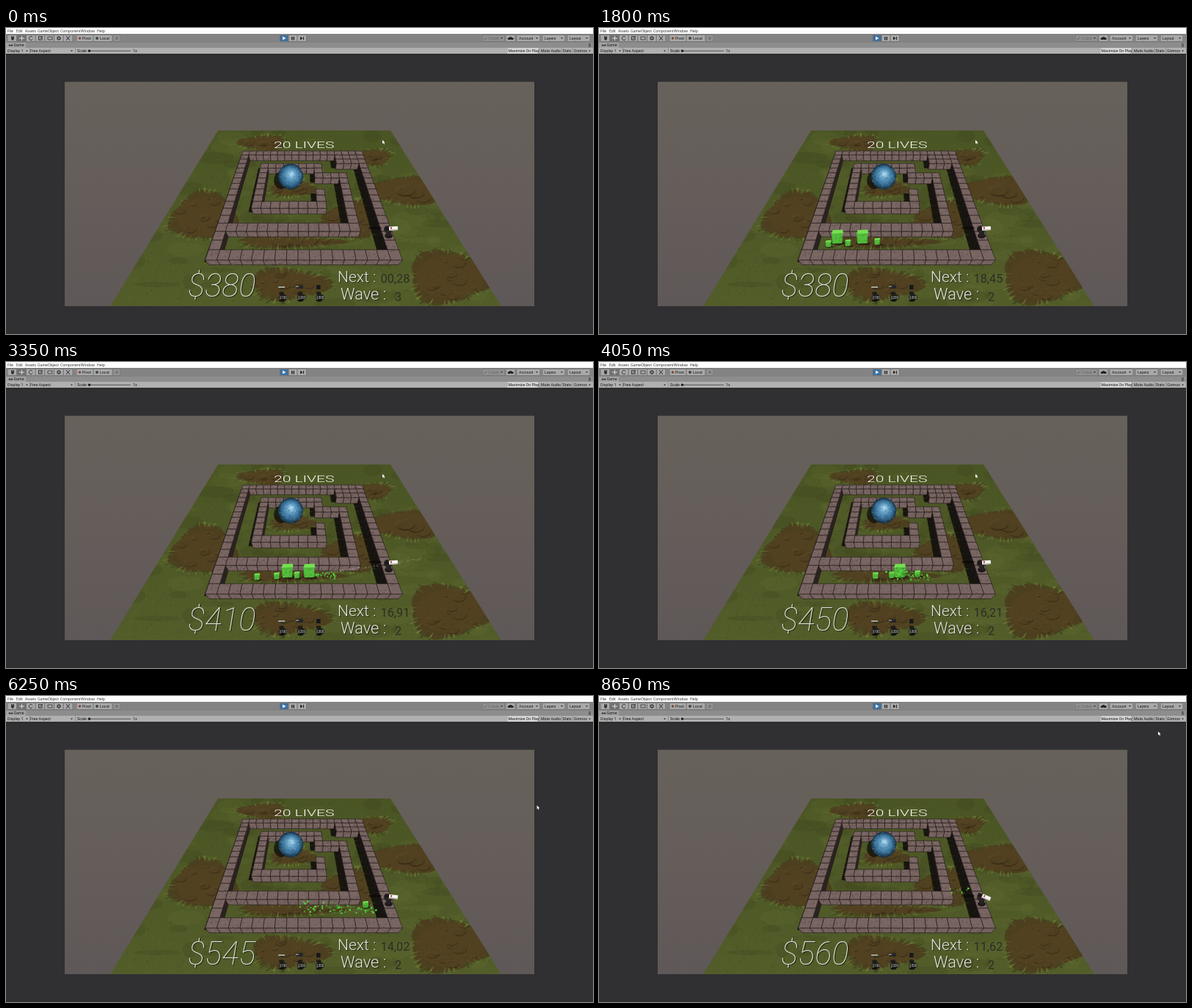
Recreate the animation shown at these times as an HTML page with a canvas. Size 800 by 418 pixels, loop 8700 ms.

```html
<!DOCTYPE html>
<html lang="en">
<head>
<meta charset="utf-8">
<title>Tower defence</title>
<style>
html, body { margin: 0; width: 100%; height: 100%; overflow: hidden; background: #302f32; }
canvas { display: block; width: 800px; height: 418px; }
</style>
</head>
<body>
<canvas id="stage" width="800" height="418"></canvas>
<script>
const LOOP = 8.7, TAU = Math.PI * 2;
const stage = document.getElementById('stage').getContext('2d');
const base = document.createElement('canvas');
base.width = 800; base.height = 418;
let g = base.getContext('2d');

function seeded(seed) {
  return () => {
    seed = (seed + 0x6D2B79F5) | 0;
    let v = Math.imul(seed ^ (seed >>> 15), 1 | seed);
    v ^= v + Math.imul(v ^ (v >>> 7), 61 | v);
    return ((v ^ (v >>> 14)) >>> 0) / 4294967296;
  };
}
const clamp = k => Math.min(1, Math.max(0, k));
const ease = k => { k = clamp(k); return k * k * (3 - 2 * k); };
function rect(x, y, w, h, color) { g.fillStyle = color; g.fillRect(x, y, w, h); }
function trace(pts) {
  g.beginPath();
  pts.forEach(p => g.lineTo(p[0], p[1]));
  g.closePath();
}
function poly(pts, color, edge) {
  trace(pts);
  g.fillStyle = color; g.fill();
  if (edge) { g.strokeStyle = edge; g.lineWidth = 0.8; g.stroke(); }
}
function oval(x, y, rx, ry, color) {
  g.beginPath(); g.ellipse(x, y, rx, ry, 0, 0, TAU);
  g.fillStyle = color; g.fill();
}
function line(x1, y1, x2, y2, color, w = 1) {
  g.beginPath(); g.moveTo(x1, y1); g.lineTo(x2, y2);
  g.strokeStyle = color; g.lineWidth = w; g.stroke();
}
function text(s, x, y, font, color) {
  g.font = font; g.fillStyle = color; g.fillText(s, x, y);
}

// camera looking down on the 17 x 17 board
const F = 266, COS = 0.6836, SIN = 0.7299;
function project(col, high, row) {
  const z = 7.3 + 0.953 * row, h = 17.2 - high, d = z * COS + h * SIN;
  return [401 + F * (col - 8.19) / d, 226 + F * (h * COS - z * SIN) / d];
}

const GROUND = [[289, 140], [524, 140], [675, 380], [142, 380]];
// dirt patches: x, y, rx, ry
const DIRT = [
  [350, 157, 36, 11], [500, 176, 28, 12], [545, 222, 60, 21], [270, 258, 50, 36],
  [605, 340, 62, 40], [385, 350, 58, 24], [470, 262, 40, 28], [385, 292, 80, 9], [390, 218, 34, 14]
];

function drawDirt([x, y, rx, ry], r) {
  const n = 40, size = 0.4 + y / 400;
  const rim = Array.from({ length: n }, (_, i) => {
    const a = i / n * TAU, k = 0.88 + 0.12 * Math.sin(a * 3 + x) + r() * 0.08;
    return [x + rx * k * Math.cos(a), y + ry * k * Math.sin(a)];
  });
  poly(rim, '#4c3f1f');
  g.save(); trace(rim); g.clip();
  oval(x, y, rx * 0.75, ry * 0.75, 'rgba(88,68,34,.45)');
  for (let i = 0; i < 12; i++) {
    const a = r() * TAU, k = r() * 0.75, s = 2 + r() * rx * 0.17;
    const sx = x + Math.cos(a) * rx * k, sy = y + Math.sin(a) * ry * k;
    oval(sx + 0.7, sy + 1, s, s * 0.6, 'rgba(45,34,16,.5)');
    oval(sx, sy, s, s * 0.55, 'rgba(98,80,42,.5)');
  }
  g.restore();
  // blades of grass lean in over the dirt
  rim.forEach(([px, py]) => {
    for (let j = 0; j < 2; j++) {
      const dx = (x - px) / rx, dy = (y - py) / ry, len = (5 + r() * 9) * size;
      const bx = px - dx * 4 + (r() - 0.5) * 5, by = py - dy * 3;
      poly([[bx - 1.5 * size, by], [bx + dx * len + (r() - 0.5) * 4, by + dy * len * 0.7], [bx + 1.5 * size, by + 1]],
        `hsl(${68 + r() * 8},${36 + r() * 8}%,${19 + r() * 15}%)`);
    }
  });
}

function drawGround() {
  const r = seeded(7);
  g.save();
  trace(GROUND); g.clip();
  const grad = g.createLinearGradient(0, 140, 0, 380);
  grad.addColorStop(0, '#4a5524'); grad.addColorStop(1, '#525d2a');
  rect(80, 140, 640, 240, grad);
  for (let i = 0; i < 130; i++) {
    oval(150 + r() * 520, 140 + r() * 240, 8 + r() * 24, 3 + r() * 9,
      r() < 0.5 ? 'rgba(42,42,16,.14)' : 'rgba(120,124,62,.1)');
  }
  DIRT.forEach(d => drawDirt(d, r));
  for (let i = 0; i < 2600; i++) {
    const x = 140 + r() * 540, y = 140 + r() * 240, s = 0.4 + y / 300;
    line(x, y, x + (r() - 0.5) * 3 * s, y - r() * 2.5 * s,
      r() < 0.55 ? 'rgba(25,28,8,.16)' : 'rgba(130,135,75,.14)', 0.8);
  }
  g.restore();
}

// walls as col, row, cols, rows
const WALLS = [
  [0, 0, 17, 1], [0, 16, 17, 1], [0, 0, 1, 17], [16, 0, 1, 17],
  [1, 3, 13, 1], [13, 3, 1, 9], [10, 11, 4, 1], [10, 11, 1, 3],
  [3, 13, 8, 1], [3, 6, 1, 8], [3, 6, 8, 1], [10, 6, 1, 3], [13, 14, 3, 2]
];

function drawWalls() {
  const r = seeded(31), cells = new Set();
  WALLS.forEach(([c, row, w, d]) => {
    for (let i = 0; i < w; i++) for (let j = 0; j < d; j++) cells.add((row + j) * 17 + c + i);
  });
  const order = [...cells].map(k => [k % 17, Math.floor(k / 17)]);
  // the sun stands to the right, so shadows fall left and back
  order.forEach(([c, row]) => poly([
    project(c - 0.55, 0, row + 0.3), project(c + 1, 0, row),
    project(c + 1, 0, row + 1.25), project(c - 0.55, 0, row + 1.25)], '#16150d'));
  order.sort((a, b) => b[1] - a[1] || Math.abs(b[0] - 7.7) - Math.abs(a[0] - 7.7));
  const face = (pts, color) => {
    poly(pts, color, 'rgba(35,27,26,.8)');
    g.save(); trace(pts); g.clip();
    const [p, q, s] = pts;
    for (let i = 0; i < 12; i++) {
      rect(p[0] + (q[0] - p[0]) * r(), p[1] + (s[1] - p[1]) * r(), 1 + r() * 2, 0.9,
        r() < 0.5 ? 'rgba(40,28,26,.25)' : 'rgba(185,160,155,.18)');
    }
    g.restore();
  };
  order.forEach(([c, row]) => {
    const p = (x, h, z) => project(c + x, h, row + z);
    const side = c + 0.5 < 8.19 ? 1 : 0;
    poly([p(side, 1, 0), p(side, 1, 1), p(side, 0, 1), p(side, 0, 0)], side ? '#29221f' : '#171312');
    face([p(0, 1, 0), p(1, 1, 0), p(1, 0, 0), p(0, 0, 0)], '#75625f');
    face([p(0, 1, 1), p(1, 1, 1), p(1, 1, 0), p(0, 1, 0)], '#786562');
  });
}

function drawOrbBase() {
  oval(375, 208, 10, 12, 'rgba(8,10,6,.7)');
  const grad = g.createRadialGradient(389, 199, 1, 388, 203, 17.5);
  grad.addColorStop(0, '#a9d6ec'); grad.addColorStop(0.3, '#639fc4');
  grad.addColorStop(0.7, '#356b91'); grad.addColorStop(1, '#142b3c');
  oval(388, 203, 17.2, 17.5, grad);
}

function button(x, w, color = '#a9a9a9') {
  rect(x, 9.5, w, 9, '#6c6c6c');
  rect(x + 0.5, 10, w - 1, 8, color);
}
function caret(x, y) { poly([[x, y], [x + 3, y], [x + 1.5, y + 2]], '#333'); }

function drawEditor() {
  const menu = '5px "Open Sans", sans-serif', ui = '5.3px Roboto, sans-serif', ink = '#181818';
  rect(0, 0, 800, 418, '#302f32');
  rect(0, 0, 800, 8, '#fdfdfd');
  [['File', 2], ['Edit', 14], ['Assets', 26], ['GameObject', 43], ['Component', 74], ['Window', 102], ['Help', 124]]
    .forEach(([s, x]) => text(s, x, 6, menu, '#222'));
  rect(0, 8, 800, 12, '#838383');
  rect(0, 20, 800, 7, '#8d8d8d');
  rect(0, 20, 27, 7, '#a2a2a2');
  rect(0, 27, 800, 8.5, '#b0b0b0');
  rect(0, 35.5, 800, 1, '#161618');

  for (let i = 0; i < 7; i++) button(2 + i * 12.7, 12.7, i === 1 ? '#727272' : undefined);
  g.lineWidth = 0.9;
  oval(9, 14.5, 2, 2.2, '#333');
  for (let i = 0; i < 3; i++) line(7.5 + i * 1.5, 11, 7.5 + i * 1.5, 14, '#333', 0.9);
  line(18, 14, 25, 14, '#ddd'); line(21.5, 10.8, 21.5, 17.2, '#ddd');
  g.strokeStyle = '#333';
  g.beginPath(); g.arc(34, 14, 2.6, 0.5, 5.7); g.stroke();
  g.strokeRect(44.5, 11.7, 4.5, 4.5);
  line(46, 15, 50, 11, '#333', 0.8);
  g.strokeRect(57, 12, 6, 4);
  oval(72, 14, 2.7, 2.7, '#444'); oval(72, 14, 1.1, 1.1, '#a9a9a9');
  line(82, 11, 87, 17, '#222'); line(87, 11, 82, 17, '#222');
  button(96, 23); text('Pivot', 104, 16, ui, ink);
  button(119, 26); text('Local', 128, 16, ui, ink);
  oval(100.5, 14, 1.8, 1.8, '#8a4436'); oval(124, 14, 2, 2, '#444');
  button(146, 10, '#949494'); oval(151, 14, 2.2, 2.2, '#777');

  button(373, 12, '#3f709c'); button(385, 12); button(397, 12.5);
  poly([[377, 11.5], [381.5, 14], [377, 16.5]], '#e8f4ff');
  rect(389, 12, 1.4, 4.5, '#222'); rect(391.6, 12, 1.4, 4.5, '#222');
  poly([[401, 11.8], [404.5, 14], [401, 16.4]], '#222'); rect(405, 12, 1, 4.3, '#222');

  button(649, 31, '#909090'); text('Collab', 657, 16, ui, '#6a6a6a'); caret(674, 13);
  line(651.5, 14, 653, 16, '#666', 0.8); line(653, 16, 655.5, 12, '#666', 0.8);
  button(681, 13);
  for (let i = 0; i < 3; i++) oval(685.7 + i * 2, 14.6 - (i === 1 ? 0.8 : 0), 2, 1.7, '#222');
  [['Account', 696, 32], ['Layers', 731, 31], ['Layout', 765, 31]].forEach(([s, x, w]) => {
    button(x, w); text(s, x + 3, 16, ui, ink); caret(x + w - 6, 13);
  });

  oval(5, 23.7, 1.4, 1.1, '#333'); oval(8, 23.7, 1.4, 1.1, '#333');
  text('Game', 10.5, 25.4, ui, ink);
  for (let i = 0; i < 3; i++) rect(794, 21.5 + i * 1.7, 3, 0.8, '#333');

  [32, 94, 683, 726, 757, 772].forEach(x => rect(x, 27, 0.7, 8.5, '#868686'));
  line(112, 31.3, 170, 31.3, '#555'); oval(113.5, 31.3, 1.8, 1.8, '#222');
  rect(683.5, 27.5, 42, 7.5, '#d9d9d9');
  [['Display 1', 2], ['Free Aspect', 33], ['Scale', 97], ['1x', 173], ['Maximize On Play', 684.5],
    ['Mute Audio', 729], ['Stats', 758.5], ['Gizmos', 774]].forEach(([s, x]) => text(s, x, 33, ui, ink));
  [27, 88, 794].forEach(x => caret(x, 30.5));
}

function drawShop() {
  rect(371, 353, 9, 2, '#a4a49a'); rect(374, 355, 5, 1.5, '#2a2a28');
  rect(396, 351.5, 9, 4.5, '#26262a'); rect(395, 352, 4, 2, '#77776f');
  rect(423, 351, 5.5, 6, '#17171a');
  for (let i = 0; i < 3; i++) {
    const x = 377.5 + i * 25.3;
    oval(x - 2, 362.5, 3.5, 2.3, '#1d1d1a');
    oval(x, 368, 6, 4.3, '#1b1b19');
    oval(x - 1.5, 372, 4, 1.8, '#121211');
    text('$' + (i + 1) + '00', x - 5, 370.2, '4.6px Roboto, sans-serif', '#cfcfc8');
  }
}

function drawBase() {
  drawEditor();
  const sky = g.createLinearGradient(0, 73, 0, 380);
  sky.addColorStop(0, '#67615b'); sky.addColorStop(0.4, '#655e5a'); sky.addColorStop(1, '#5f5858');
  rect(80, 73.5, 640, 306.5, sky);
  drawGround();
  drawWalls();
  drawOrbBase();
  oval(503, 273, 9, 2, 'rgba(10,8,8,.7)');
  drawShop();
}

// each cube walks the path from its birth until a shot ends it
const CUBES = [
  { big: true, born: 0.2, speed: 35, dies: 3.75, pays: 40 },
  { big: true, born: 1.22, speed: 37.8, dies: 5.08, pays: 40 },
  { born: 0.44, speed: 56, dies: 2.86, pays: 15 },
  { born: 1.14, speed: 55, dies: 3.3, pays: 15 },
  { born: 1.62, speed: 54, dies: 5.02, pays: 40, blast: 0.75 },
  { born: 1.82, speed: 43, dies: 7.15, pays: 15, blast: 1.2 },
  { born: 2.56, speed: 49.5, dies: 5.65, pays: 15 }
];

function place(cube, t) {
  const far = 303 + cube.speed * (t - cube.born), x = Math.min(490, far);
  const lane = cube.big ? 285 : 295 - (x - 303) * 0.045;
  return [x, lane - Math.max(0, far - 490) * 0.55];
}

function drawCube([x, y], big, seed) {
  const w = big ? 8 : 4, h = big ? 9.5 : 4.7, lid = big ? 5 : 2.4, r = seeded(seed);
  oval(x + 1, y + h - 0.5, w + 2, big ? 3 : 1.6, 'rgba(10,14,4,.5)');
  poly([[x - w, y - h + lid], [x + w * 0.9, y - h + lid - 0.6], [x + w * 0.8, y + h - 0.6], [x - w * 0.85, y + h]], '#50b83a');
  poly([[x - w * 0.8, y - h + 0.5], [x + w * 0.9, y - h], [x + w, y - h + lid], [x - w, y - h + lid + 0.4]], '#74e052');
  for (let i = 0; i < (big ? 26 : 7); i++) {
    rect(x + (r() - 0.5) * w * 1.7, y - h + lid + r() * (2 * h - lid - 1), 1.2, 1,
      r() < 0.5 ? '#3b9a2b' : '#6cd44e');
  }
}

function drawOrbSpecks(t) {
  const r = seeded(88);
  for (let i = 0; i < 210; i++) {
    const lat = Math.asin(r() * 2 - 1), lon = r() * TAU + t * 0.4, dark = r() < 0.6;
    if (Math.cos(lon) < 0.1) continue;
    rect(387.5 + 16.3 * Math.cos(lat) * Math.sin(lon), 202.5 + 16.5 * Math.sin(lat), 1.1, 1.1,
      dark ? 'rgba(14,45,68,.42)' : 'rgba(190,228,245,.32)');
  }
}

function drawTurret(t) {
  oval(521.5, 284, 5.5, 3.5, '#1f1a1b');
  rect(518, 276, 7, 8, '#262122');
  oval(519.5, 275, 4.5, 5, '#2a2526');
  g.save();
  g.translate(525, 274); g.rotate(-0.06 + 0.46 * ease((t - 5.8) / 1.1));
  rect(-9, -2, 7, 4.4, '#1d191a');
  rect(-3, -2.8, 12, 5.4, '#f4f2f2');
  rect(-3, 1.5, 12, 1.3, '#aaa3a3');
  rect(-1, -2, 2, 2.6, '#b14d48');
  g.restore();
}

// smoke along the line of fire, reaching out behind the turret
function drawShot([x, y], age, seed) {
  if (age < 0 || age > 0.17) return;
  const r = seeded(seed), dx = (528 - x) * 1.42, dy = (274 - y) * 1.42;
  for (let i = 0; i < 120; i++) {
    const k = r(), loose = 1 + k * 4;
    rect(x + dx * k + (r() - 0.5) * loose, y + dy * k + (r() - 0.5) * loose, 1, 1,
      `rgba(225,215,208,${(0.85 - k * 0.45) * (1 - age * 3)})`);
  }
}

function drawBurst([x, y], age, big, seed) {
  if (age < 0 || age > 2) return;
  const r = seeded(seed), out = 1 - Math.exp(-age * 5);
  for (let i = 0; i < (big ? 34 : 22); i++) {
    const a = r() * TAU, d = 3 + r() * (big ? 24 : 14), life = 1.4 + r() * 0.6;
    const s = (1 + r() * 1.6) * clamp((life - age) * 3), shade = r() < 0.5 ? '#58cf3f' : '#3c9a2c';
    rect(x + (Math.cos(a) * d - (big ? 26 : 0)) * out, y + Math.sin(a) * d * 0.45 * out + Math.min(3, age * 3), s, s, shade);
  }
}

function glow(x, y, radius, inner, mode) {
  const grad = g.createRadialGradient(x, y, 0, x, y, radius);
  grad.addColorStop(0, inner); grad.addColorStop(1, 'rgba(0,0,0,0)');
  g.globalCompositeOperation = mode;
  rect(x - radius, y - radius, radius * 2, radius * 2, grad);
  g.globalCompositeOperation = 'source-over';
}

function drawBlast([x, y], age, size, seed) {
  age /= 0.7;
  if (age < 0 || age > 1) return;
  const power = clamp(age * 8) * (1 - age * age), r = seeded(seed);
  g.save(); trace(GROUND); g.clip();
  glow(x, y, 130 * size, `rgba(125,38,18,${power * 0.6})`, 'color-dodge');
  glow(x, y, 24 * size, `rgba(190,85,12,${power * 0.65})`, 'lighter');
  glow(x, y + 3, 11 * size, `rgba(255,215,100,${power * 0.9})`, 'lighter');
  g.restore();
  for (let i = 0; i < 90 * size; i++) {
    const a = r() * TAU, d = r() * 28 * size * (0.4 + age), s = 0.8 + r() * 1.1;
    rect(x + Math.cos(a) * d * 0.85, y + Math.sin(a) * d - age * 8 * size, s, s,
      `rgba(255,${90 + Math.floor(r() * 140)},${30 + Math.floor(r() * 50)},${power})`);
  }
}

function shaded(s, x, y, font, color, off) {
  text(s, x + off, y + off, font, 'rgba(22,24,14,.7)');
  text(s, x, y, font, color);
}

function drawHud(t) {
  g.save();
  g.translate(365, 163.5); g.scale(1, 0.62); // text lies tilted on the board
  text('20 LIVES', 0, 0, '300 21px Roboto, sans-serif', '#fafaf8');
  g.restore();
  const money = CUBES.reduce((sum, c) => sum + (t >= c.dies ? c.pays : 0), 380);
  shaded('$' + money, 248, 366.5, 'italic 100 43.5px Roboto, sans-serif', '#e0e0da', 1.3);
  shaded('Next :', 452, 347, '300 21px Roboto, sans-serif', '#e6e6e1', 1);
  shaded('Wave :', 456, 371.3, '300 21.8px Roboto, sans-serif', '#e6e6e1', 1);
  const fresh = t >= 0.25, left = fresh ? 20.25 - 0.997 * t : 0.28 - t;
  const font = '16.3px Roboto, sans-serif', ink = '#2c2d25';
  text(left.toFixed(2).padStart(5, '0').replace('.', ','), 510.5, 348, font, ink);
  text(fresh ? '2' : '3', 530, 373, font, ink);
}

function drawCursor(t) {
  const x = 513 + 249 * ease((t - 5.8) / 0.6) + 22 * Math.sin(Math.PI * clamp((t - 6.3) / 0.95));
  const y = 153 - 104.5 * ease((t - 6.1) / 1.4);
  poly([[x, y], [x, y + 5], [x + 1.2, y + 4], [x + 2.2, y + 5.8], [x + 3, y + 5.3], [x + 2.2, y + 3.6], [x + 3.6, y + 3.4]], '#f8f8f8');
}

function draw(t) {
  g.drawImage(base, 0, 0);
  drawOrbSpecks(t);
  CUBES.forEach((c, i) => {
    if (t >= c.born && t < c.dies) drawCube(place(c, t), c.big, i + 3);
  });
  CUBES.forEach((c, i) => {
    const end = place(c, c.dies), age = t - c.dies;
    if (c.blast) drawBlast([end[0] - 3, end[1] + 5], age, c.blast, 50 + i);
    drawBurst(end, age, c.big, 20 + i);
    drawShot(end, age + 0.1, 70 + i);
  });
  drawTurret(t);
  drawHud(t);
  drawCursor(t);
}

drawBase();
g = stage;
const start = performance.now();
function frame() {
  draw((performance.now() - start) / 1000 % LOOP);
  requestAnimationFrame(frame);
}
draw(0);
requestAnimationFrame(frame);
</script>
</body>
</html>
```
